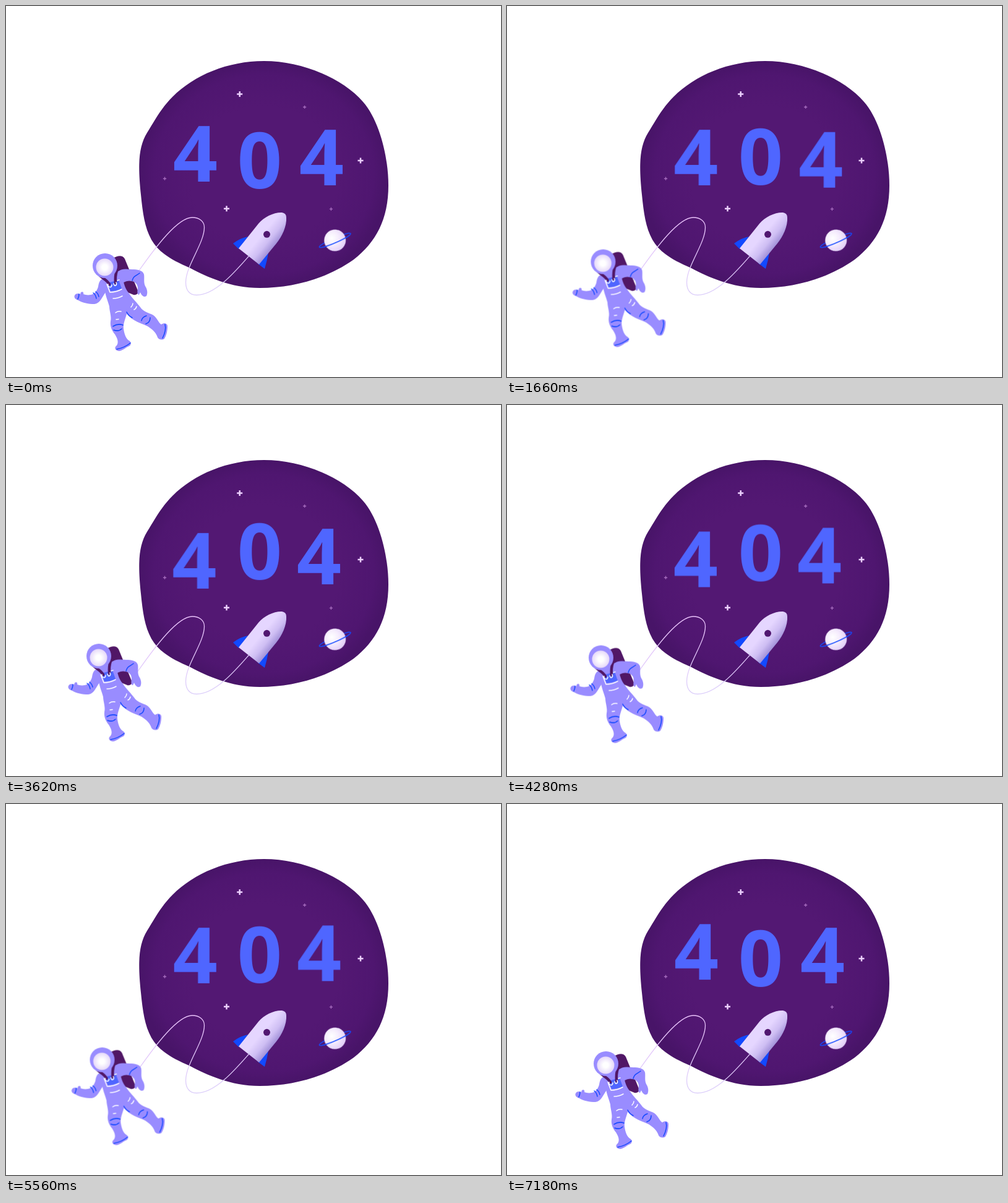
Recreate the animation shown at these times as an HTML page. Size 800 px wide and 600 px high, loop 7200 ms.

```html
<!DOCTYPE html>
<html lang="en">
<head>
<meta charset="utf-8">
<title>404</title>
<style>
  html, body { margin: 0; width: 100%; height: 100%; overflow: hidden; background: #fff; }
  svg { display: block; width: 100vw; height: 100vh; }
  .digit { font: 700 126.5px "Open Sans", "Noto Sans", sans-serif; fill: #4f66ff; }
  .drift { animation: 7.2s linear infinite; }
  .astronaut { animation-name: float; }
  .first { animation-name: sink; }
  .zero { animation-name: rise; }
  .last { animation-name: sway-x; }
  .last .digit { animation: sway-y 7.2s linear infinite; }
  .line { fill: none; stroke-linecap: round; stroke-linejoin: round; stroke-width: 1.5; }
  .blue { stroke: #1249ff; }
  .white { stroke: #fff; }
  .strap { stroke: #511766; stroke-width: 4.5; }
  .suit { fill: #998cff; }

  @keyframes float { 50% { transform: translate(-10px, -14px); } }
  @keyframes rise { 50% { transform: translateY(-13px); } }
  @keyframes sink {
    50% { transform: translate(-1.6px, 13px); }
    85% { transform: translate(.2px, 3.9px); }
  }
  @keyframes sway-x {
    11% { transform: translateX(-.8px); }
    34% { transform: translateX(-4.4px); }
    50% { transform: translateX(-4px); }
    67% { transform: translateX(-5.5px); }
  }
  @keyframes sway-y {
    25% { transform: translateY(4px); }
    50% { transform: none; }
    75% { transform: translateY(-4px); }
  }
</style>
</head>
<body>
<svg viewBox="0 0 800 600">
  <defs>
    <radialGradient id="space">
      <stop offset=".6" stop-color="#531873"/>
      <stop offset=".88" stop-color="#4f1670"/>
      <stop offset="1" stop-color="#481468"/>
    </radialGradient>
    <linearGradient id="hull" gradientUnits="userSpaceOnUse" x1="400" y1="358" x2="435" y2="387">
      <stop offset=".4" stop-color="#e5d6ff"/>
      <stop offset=".72" stop-color="#cebef3"/>
      <stop offset="1" stop-color="#a190d8"/>
    </linearGradient>
    <radialGradient id="globe" cx=".35" cy=".4" r=".65">
      <stop offset="0" stop-color="#fff"/>
      <stop offset=".5" stop-color="#f5ecfd"/>
      <stop offset="1" stop-color="#e3d0f8"/>
    </radialGradient>
    <radialGradient id="visor">
      <stop offset=".3" stop-color="#fff"/>
      <stop offset="1" stop-color="#e6d9fa"/>
    </radialGradient>
    <linearGradient id="cord" x2="0" y2="1">
      <stop offset="0" stop-color="#eac2fb"/>
      <stop offset="1" stop-color="#dccffa"/>
    </linearGradient>
    <path id="plus" d="M-4.5 0H4.5M0-4.5V4.5"/>
  </defs>

  <path fill="url(#space)" d="M417 89C480 89 545 118 577 155C604 186 618 245 618 290C618 345 598 382 562 410C520 440 465 456 410 456C363 456 325 438 298 424C268 411 247 399 235 378C224 358 221 335 218 305C213 256 214 228 228 205C240 186 250 166 269 147C304 112 358 89 417 89Z"/>

  <g stroke="#ecd0ff" stroke-width="2.5">
    <use href="#plus" x="377.7" y="142.5"/>
    <use href="#plus" x="573" y="250"/>
    <use href="#plus" x="356.5" y="327.8"/>
  </g>
  <g stroke="#a56bbd" stroke-width="2.4">
    <use href="#plus" transform="translate(482.6 163.5) scale(.58)"/>
    <use href="#plus" transform="translate(256.5 279.2) scale(.58)"/>
    <use href="#plus" transform="translate(525.4 328.4) scale(.58)"/>
  </g>

  <g class="drift first"><text class="digit" x="269.8" y="284.2">4</text></g>
  <g class="drift zero"><text class="digit" x="373.7" y="294.9">0</text></g>
  <g class="drift last"><text class="digit" x="473.8" y="290.2">4</text></g>

  <path class="line" stroke="url(#cord)" style="stroke-width:1.3" d="M392 405C370 430 338 467.500 308 467.500C296 467.500 290.500 459 290.500 447C290.500 420 320.500 384 320.500 358C320.500 348 312 342 301 342C278 342 243 388 213.500 430L203 447"/>

  <g>
    <path fill="#1249ff" d="M367 384Q379 375 391 373L376 393ZM424 399Q422 412 418 425L406 416Z"/>
    <path fill="url(#hull)" d="M376 392L408 352C417 341 433 333.500 446 334Q453 335 453 342C454 356 446 373 437 384L409 418Z"/>
    <circle cx="421.500" cy="369.300" r="5.500" fill="#511770"/>
  </g>

  <g class="line blue" transform="translate(531.700 379) rotate(-23.500)">
    <path d="M-27.500 0A27.500 3.800 0 0 1 27.500 0"/>
    <circle r="17.500" fill="url(#globe)" stroke="none" transform="rotate(23.500)"/>
    <path d="M-27.500 0A27.500 3.800 0 0 0 27.500 0"/>
  </g>

  <g class="drift astronaut">
    <path fill="#511766" d="M173 408C180 404 188 402 192 409L213 460C215 465 210 468 206 467L184 458Z"/>
    <g class="suit">
      <path d="M157 441C166 438 172 432 184 428L190 446C192 455 195 460 199 465C205 474 212 480 217 487C222 495 231 496 238 500C244 504 247 513 251 515C255 512 261 513 261 518C261 526 259 533 256 538C252 541 246 539 245 536C243 529 237 523 229 518C219 513 205 510 195 498C193 506 189 514 190 522C191 530 194 539 200 542C203 544 202 549 199 550C193 552 190 557 183 558C178 558 175 554 177 551C183 546 181 539 176 531C171 525 168 518 169 510C171 503 167 493 167 486C165 478 162 472 160 462Z"/>
      <path d="M160 440C152 441 150 447 149 454C147 461 143 466 137 467C132 468 128 467 125 466C126 463 124 461 121 463L120 466C117 464 112 465 111 468C109 472 113 475 117 476C124 480 133 482 143 482C152 481 155 471 161 463Z"/>
      <path d="M182 429C188 424 194 426 204 426C212 426 221 427 223 434C224 440 222 447 225 453C229 459 229 465 227 469C223 472 219 468 217 463L215 467C212 467 212 462 213 457C213 451 210 446 203 445C196 443 191 447 185 449Z"/>
    </g>
    <path fill="#4f66ff" d="M164 448L182 443L187 457Q178 461 169 461Z"/>
    <path class="line strap" d="M149 432C154 441 162 441 167 450M188 417C179 422 176 433 177 448"/>
    <circle class="suit" cx="160" cy="420" r="20"/>
    <circle cx="159.500" cy="422.500" r="14" fill="url(#visor)"/>
    <path class="line white" d="M163 450L168 463Q178 463 187 458M165 450C164 455 171 457 171 451M174 449C175 455 180 452 178 447M180 444L183 443M173 473Q181 473 188 469M177 496Q181 493 186 494M178 507L182 506.500M202 487Q205 484 205 481M207 491Q210 490 211 486"/>
    <path class="line blue" d="M118 466Q118 470 116 474M141 464Q145 467 146 473M145 462Q149 465 150 470M204 444C206 436 211 436 216 432M195 495Q198 501 204 504M173 518Q181 513 189 516M174 524Q182 527 187 522M219 509Q220 503 227 501M226 514Q233 512 233 504M179 555Q191 553 201 545M257 515C259 522 256 531 253 537"/>
  </g>
</svg>
</body>
</html>
```
